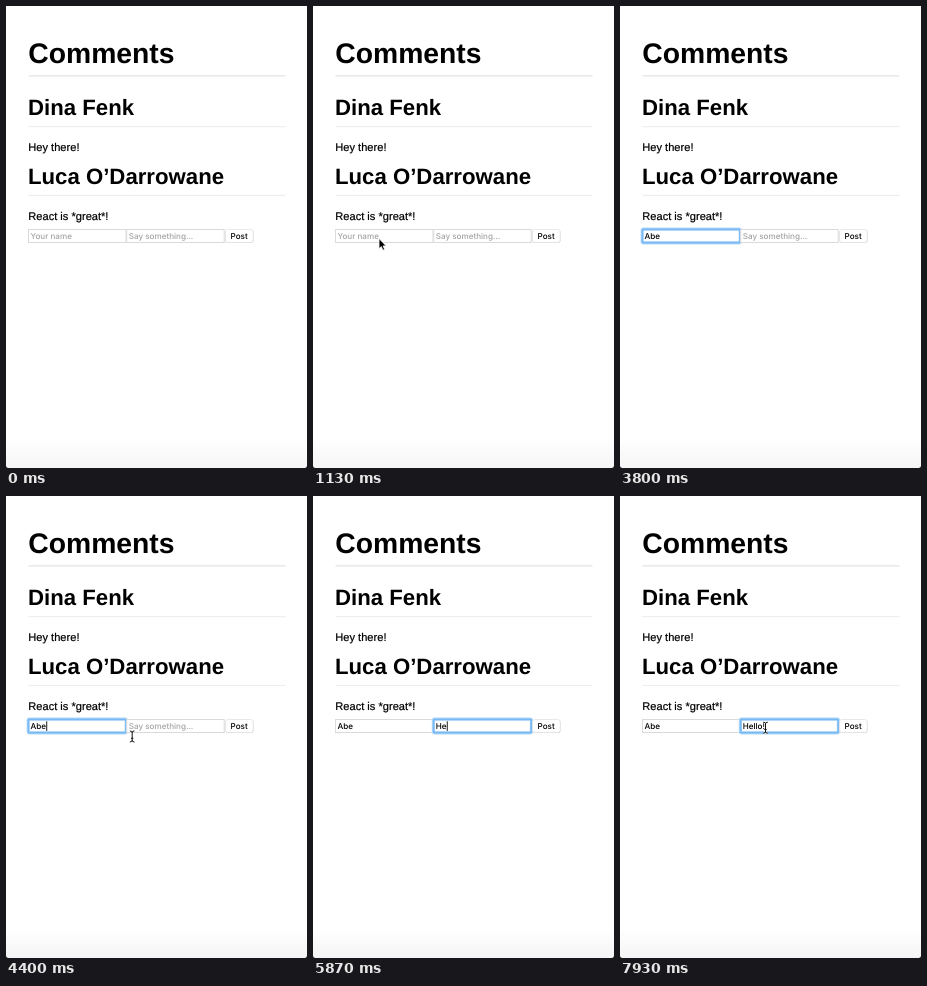
An HTML page for the animation above (8000 ms loop, 301x462 px).

```html
<!DOCTYPE html>
<html lang="en">
<head>
<meta charset="utf-8">
<title>Comments</title>
<style>
  html, body { margin: 0; width: 100%; height: 100%; overflow: hidden; background: #fff; }
  svg { display: block; width: 100vw; height: 100vh; }
  text { font: 11.1px "Liberation Sans", Arial, sans-serif; text-rendering: geometricPrecision; white-space: pre; }
  .body { stroke: #000; stroke-width: .2; }
  .h1 { font-size: 28.3px; font-weight: bold; }
  .h2 { font-size: 22.2px; font-weight: bold; }
  .ui { font: 500 8.1px Inter, "Liberation Sans", sans-serif; }
  .hint { fill: #a4a4a4; }
  .rule { fill: #ececec; }
  .box { fill: #fff; stroke: #dadada; stroke-width: 1; }
  .glow { fill: none; stroke: #b5dafa; stroke-width: 3.2; }
  .focus { fill: none; stroke: #78b9f4; stroke-width: 1.7; }
  .stem { fill: none; stroke: #111; }
  .halo { stroke: #fff; stroke-width: 2; opacity: .7; }
</style>
</head>
<body>
<svg viewBox="0 0 301 462" preserveAspectRatio="none">
  <defs>
    <linearGradient id="fade" x1="0" y1="0" x2="0" y2="1">
      <stop offset="0" stop-color="#fff"/>
      <stop offset="1" stop-color="#f5f5f5"/>
    </linearGradient>
    <path id="stem" d="M-2.3 -5.5Q0 -5.5 0 -4Q0 -5.5 2.3 -5.5M0 -4.5V4.5M-2.3 5.5Q0 5.5 0 4Q0 5.5 2.3 5.5M-1.2 1.8H1.2"/>
  </defs>
  <rect width="301" height="462" fill="#fff"/>
  <rect y="432" width="301" height="30" fill="url(#fade)"/>
  <path d="M0 460 Q.3 461.7 2 462 H0Z M301 460 Q300.7 461.7 299 462 H301Z" fill="#222"/>

  <text class="h1" x="22.3" y="56.8">Comments</text>
  <rect x="22.5" y="69.4" width="257" height="1" fill="#dcdcdc"/>
  <text class="h2" x="22" y="108.6">Dina Fenk</text>
  <rect class="rule" x="22.5" y="120.2" width="257" height="1"/>
  <text class="body" x="22.3" y="145.2">Hey there!</text>
  <text class="h2" x="22" y="177.6">Luca O’Darrowane</text>
  <rect class="rule" x="22.5" y="188.9" width="257" height="1"/>
  <text class="body" x="22.3" y="214.2">React is *great*!</text>

  <g id="name" transform="translate(22.5 223.5)"></g>
  <g id="say" transform="translate(120.7 223.5)"></g>

  <rect x="219.5" y="224" width="28" height="13" rx="2.5" fill="#d2d2d2"/>
  <rect x="219.5" y="223.5" width="27.7" height="13" rx="2.5" fill="#fff" stroke="#e2e2e2" stroke-width=".8"/>
  <text class="ui" x="224.6" y="233">Post</text>

  <circle id="ring" fill="none" stroke="#111" stroke-width="1.5"/>
  <path id="arrow" d="M0 0V10.2L2.3 8.1L3.9 11.7L5.7 10.9L4.1 7.4H7.2Z" stroke="#fff" stroke-width=".8"/>
  <g id="beam">
    <use href="#stem" class="stem halo"/>
    <use href="#stem" class="stem"/>
  </g>
</svg>
<script>
const LOOP = 8000, TICK = 1000 / 15, BLINK = 470;
const ENTER = 260, WAKE = 1260, CLICK1 = 1790, TYPE1 = 2590;
const MOVE = 4060, CLICK2 = 4520, TYPE2 = 5590, RETURN = 7660;

const $ = id => document.getElementById(id);
const show = (el, on) => el.setAttribute('visibility', on ? 'visible' : 'hidden');
const between = (t, a, b) => t >= a && t < b;
const part = (t, a, b) => Math.min(1, Math.max(0, (t - a) / (b - a)));
const ease = (t, a, b) => { const p = part(t, a, b); return p * p * (3 - 2 * p); };

// Text field with placeholder, typed text, caret and focus glow.
// Key i is pressed at first + span * (i / last) ^ rhythm.
function field(id, hint, word, focus, blur, first, span, rhythm) {
  const g = $(id);
  g.innerHTML = `<rect class="box" width="97.5" height="13"/>
    <g><rect class="glow" x="-.3" y="-.3" width="98" height="13.6" rx="1"/>
    <rect class="focus" x="-.1" y="-.1" width="97.6" height="13.2" rx=".6"/></g>
    <text class="ui hint" x="2" y="9.4">${hint}</text>
    <text class="ui" x="2" y="9.4"></text>
    <rect y="1.8" width=".9" height="9.6"/>`;
  const [, glow, ghost, text, caret] = g.children;
  const last = word.length - 1;
  const keys = [...word].map((_, i) => first + span * (i / last) ** rhythm);
  return t => {
    const n = keys.filter(k => t >= k).length;
    const active = between(t, focus, blur);
    const idle = t - (n ? keys[n - 1] : focus);
    text.textContent = word.slice(0, n);
    show(ghost, !n);
    show(glow, active);
    show(caret, active && Math.floor(idle / BLINK) % 2 === 0);
    caret.setAttribute('x', n ? 2.3 + text.getComputedTextLength() : 2);
  };
}

const fields = [
  field('name', 'Your name', 'Abe', CLICK1 + 70, CLICK2 + 70, TYPE1, 730, .3),
  field('say', 'Say something...', 'Hello! ', CLICK2 + 70, LOOP, TYPE2, 1600, 1)
];

// Sweep in from the top, nudge left, hop to the second field, drift right
function pointAt(t) {
  const nudge = ease(t, CLICK1, CLICK1 + 70);
  const x = 134 - 68 * ease(t, ENTER, 930) ** 2 - 5.5 * nudge
    + 79 * ease(t, MOVE, CLICK2) + 6 * ease(t, RETURN, 7930);
  const y = -4 + 250 * ease(t, ENTER, 930) - 13.5 * ease(t, 930, 1130) - .8 * nudge
    + 12 * Math.sin(Math.PI * part(t, MOVE, CLICK2));
  return [x, y];
}

const [ring, arrow, beam] = ['ring', 'arrow', 'beam'].map($);

function draw(t) {
  fields.forEach(f => f(t));
  const [x, y] = pointAt(t);
  for (const el of [arrow, beam]) el.setAttribute('transform', `translate(${x} ${y})`);
  show(arrow, between(t, ENTER, CLICK1));
  show(beam, between(t, CLICK1, TYPE1) || between(t, MOVE, TYPE2) || t >= RETURN);

  const waking = between(t, WAKE, WAKE + 330);
  const grow = waking ? part(t, WAKE + 70, WAKE + 270) : 0;
  show(ring, waking || between(t, CLICK1, CLICK1 + 470) || between(t, CLICK2, CLICK2 + 340));
  ring.setAttribute('cx', x);
  ring.setAttribute('cy', y - .5);
  ring.setAttribute('r', 12.5 + 5 * grow);
  ring.setAttribute('opacity', 1 - .6 * grow);
}

const start = performance.now();
function frame(now) {
  const t = Math.max(0, now - start) % LOOP;
  draw(Math.floor(t / TICK + .1) * TICK % LOOP);
  requestAnimationFrame(frame);
}
draw(0);
requestAnimationFrame(frame);
</script>
</body>
</html>
```
